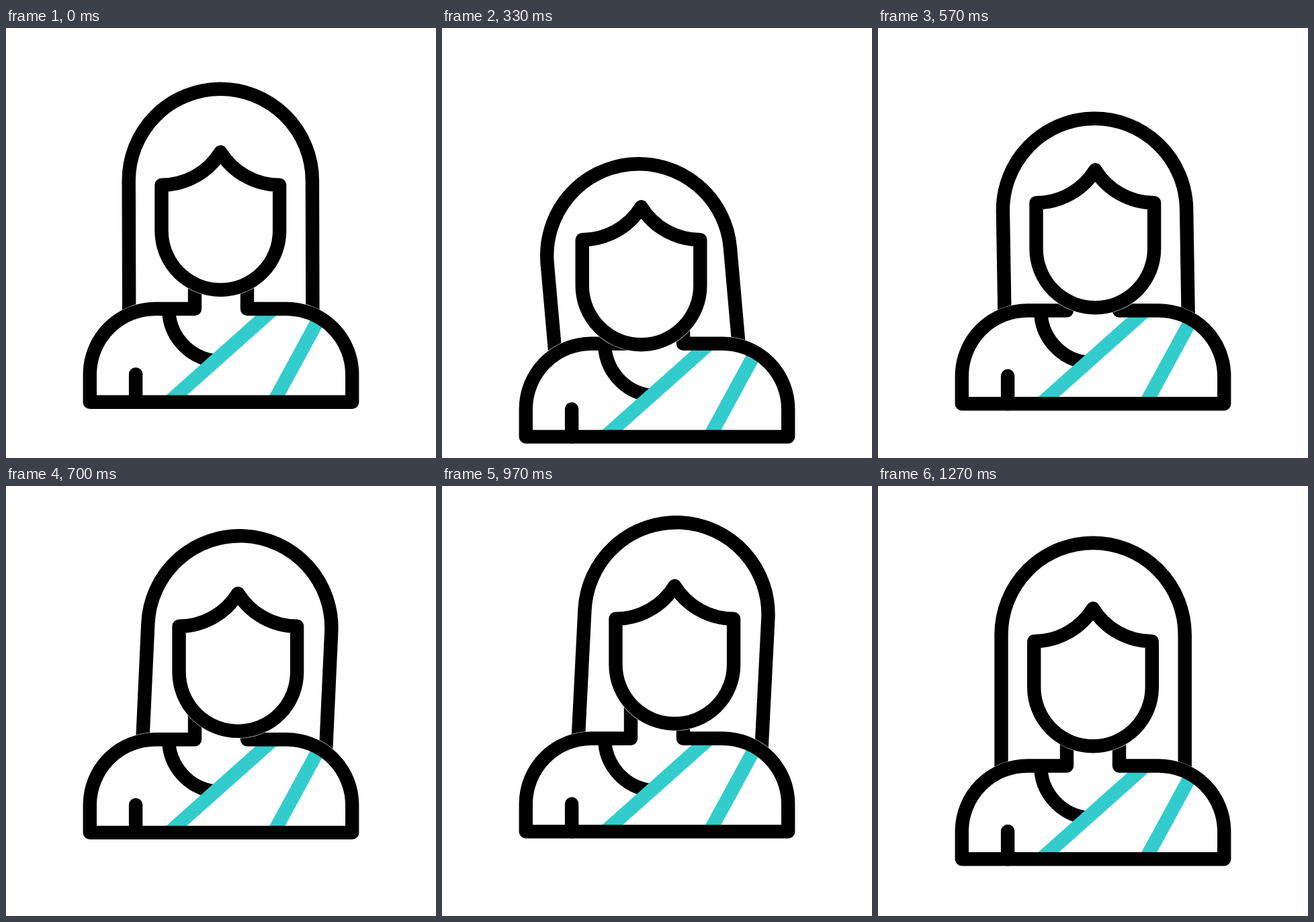
An HTML page that plays this animation: 640 px wide and 640 px high, repeating every 1670 ms.

```html
<!DOCTYPE html>
<html lang="en">
<head>
<meta charset="utf-8">
<title>Woman in a sari</title>
<style>
  html, body { margin: 0; height: 100%; overflow: hidden; background: #fff; }
  svg { display: block; width: 100%; height: 100%; stroke: #000; stroke-width: 20.4; stroke-linejoin: round; }
  .halo { stroke: #fff; stroke-width: 21.4; fill: #fff; }
  .sash { stroke: #3cc; }
  .round { stroke-linecap: round; }
</style>
</head>
<body>
<svg viewBox="0 0 640 640" fill="none">
  <!-- hair is centred on its own arc so that it can tilt -->
  <g id="hair"><path d="M-136.6 230V0A136.6 136.6 0 0 1 136.6 0V230"/></g>
  <g id="body">
    <use href="#torso" class="halo"/>
    <path d="M242.2 416.5A77.8 77.8 0 0 0 311 493.8"/>
    <path class="sash" d="M398 416.7L242.5 555.2M468 427L398.3 555.2"/>
    <path id="torso" d="M281 356V416.5H222.4A97.6 97.6 0 0 0 124.8 514.1V555.2H515.2V514.1A97.6 97.6 0 0 0 417.6 416.5H359V356"/>
    <path class="round" d="M193.1 513.9V555.2"/>
  </g>
  <g id="head">
    <use href="#face" class="halo"/>
    <path id="face" d="M232.2 231.2V299.5A87.8 87.8 0 0 0 407.8 299.5V231.2A103.3 103.3 0 0 1 320 182.3A103.3 103.3 0 0 1 232.2 231.2Z"/>
  </g>
</svg>
<script>
  const LOOP = 1670, STEP = 100 / 3;

  // Key times in steps; every track below has one value per key.
  const keys = [-1, 0, 4, 10, 11, 16, 17, 21, 25, 29, 32, 38];
  const tracks = {
    bodyY: [0, 1.5, 18.7, 53.2, 53.5, 20, 4, -39.3, -42.5, -40.8, -22, 0],
    headX: [0, -.7, -9.5, -23.5, -24, -3.5, 3.3, 25.3, 26.8, 26.3, 15, 0],
    headY: [0, 2.5, 29, 84, 84.8, 45, 29, -22.4, -39, -33.5, -16, 0],
    hairX: [0, -.8, -10.8, -27.3, -27.8, -5.5, 2.4, 27.7, 29.6, 28.8, 16, 0],
    hairY: [0, 6, 43.5, 117.5, 119, 67, 50, -10.5, -37.5, -30.5, -12.5, 0],
    tilt: [0, -.15, -2, -5.05, -5.15, -2, -.95, 2.65, 3.05, 2.9, 1.6, 0]
  };

  const slope = (v, i) => (v[i + 1] - v[i]) / (keys[i + 1] - keys[i]);

  // Harmonic mean of the neighbouring slopes; flat at turning points and ends.
  function tangent(v, i) {
    if (i === 0 || i === keys.length - 1) return 0;
    const a = slope(v, i - 1), b = slope(v, i);
    return a * b > 0 ? 2 * a * b / (a + b) : 0;
  }

  function valueAt(v, time) {
    const end = keys.findIndex(k => k > time);
    if (end < 0) return 0;
    const i = end - 1, span = keys[end] - keys[i], u = (time - keys[i]) / span;
    const mix = u * u * (3 - 2 * u);
    return v[i] + (v[end] - v[i]) * mix
      + span * u * (1 - u) * (tangent(v, i) * (1 - u) - tangent(v, end) * u);
  }

  const place = (id, transform) =>
    document.getElementById(id).setAttribute('transform', transform);

  function draw(now) {
    const time = Math.floor((now % LOOP + 5) / STEP);
    const at = name => valueAt(tracks[name], time);
    place('body', `translate(0 ${at('bodyY')})`);
    place('head', `translate(${at('headX')} ${at('headY')})`);
    place('hair', `translate(${320.1 + at('hairX')} ${221.3 + at('hairY')}) rotate(${at('tilt')})`);
  }

  let start;
  function tick(now) {
    start ??= now;
    draw(now - start);
    requestAnimationFrame(tick);
  }
  draw(0);
  requestAnimationFrame(tick);
</script>
</body>
</html>
```
